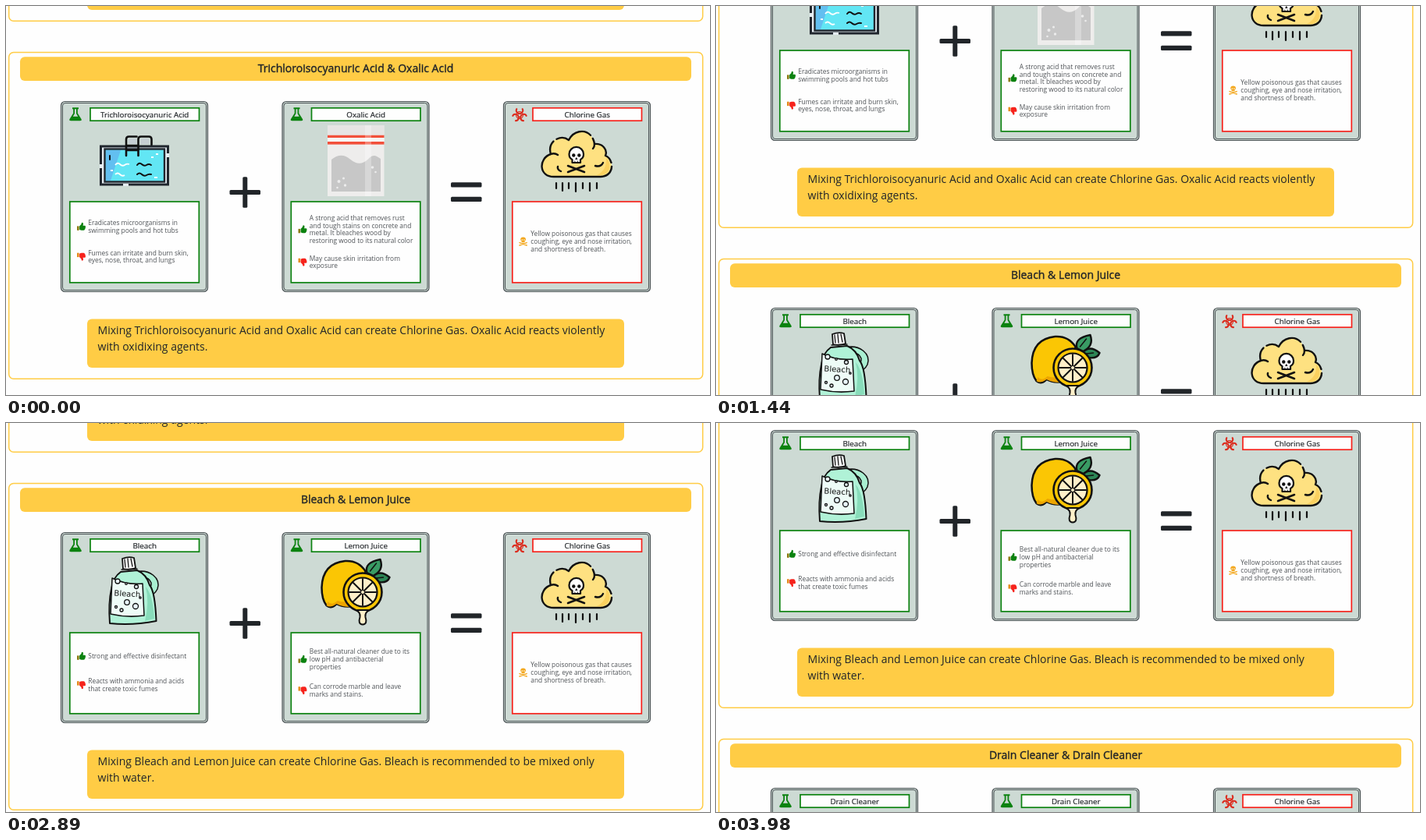
Recreate the animation shown at these times as an HTML page. Size 902 px wide and 499 px high, loop 4.05 s.

```html
<!DOCTYPE html>
<html lang="en">
<head>
<meta charset="utf-8">
<title>Dangerous mixtures</title>
<style>
  html, body { margin: 0; width: 100%; height: 100%; overflow: hidden; background: #fefefe; }
  svg { display: block; width: 100%; height: 100%; overflow: hidden; font-family: "Open Sans", sans-serif; fill: #212529; }
  .head { font-size: 14px; text-anchor: middle; stroke: #212529; stroke-width: .4px; }
  .name { font-size: 9.8px; text-anchor: middle; stroke: #212529; stroke-width: .2px; }
  .note { font-size: 8.4px; fill: #505458; }
  .caption { font-size: 14px; }
  .ink { fill: none; stroke: #111; stroke-width: 2.4px; stroke-linecap: round; stroke-linejoin: round; }
</style>
</head>
<body>
<svg><g id="page"></g></svg>
<script>
const YELLOW = '#ffcc45', GREEN = '#0b820f', RED = '#f6231c', CARD = '#cddad4', DARK = '#212529', EDGE = '#4a5154';
const PITCH = 459, COLUMN = 283.5;

const rect = (x, y, w, h, fill, more = '') =>
  `<rect x="${x}" y="${y}" width="${w}" height="${h}" fill="${fill}" ${more}/>`;
const circle = (x, y, r, fill, more = '') =>
  `<circle cx="${x}" cy="${y}" r="${r}" fill="${fill}" ${more}/>`;
const path = (d, fill = 'none', more = '') => `<path d="${d}" fill="${fill}" ${more}/>`;
const ink = (d, fill = 'none', width = 2.4) =>
  `<path class="ink" d="${d}" style="fill:${fill};stroke-width:${width}px"/>`;
const text = (cls, x, y, s) => `<text class="${cls}" x="${x}" y="${y}">${s.replace('&', '&amp;')}</text>`;
const group = (transform, body) => `<g transform="${transform}">${body}</g>`;

// Small icons
const flask = () =>
  path('M85 130.3h8v2h-1.2v5.2l4.7 7.6q1 2.2-1.6 2.2h-11.8q-2.6 0-1.6-2.2l4.7-7.6v-5.2h-1.2z', GREEN) +
  path('M88 132.3h2v5.8l2.2 3.6h-6.4l2.2-3.6z', CARD);

const biohazard = () => {
  const arm = path('M-3.2-8.6A4.1 4.1 0 1 0 3.2-8.6', 'none', 'stroke="#dc2a1c" stroke-width="2"') +
    path('M0-3V0', 'none', 'stroke="#dc2a1c" stroke-width="1.6"');
  return group('translate(91 140)',
    [0, 120, 240].map(a => group(`rotate(${a})`, arm)).join('') +
    circle(0, 0, 4.4, 'none', 'stroke="#dc2a1c" stroke-width="1.2"') + circle(0, 0, 1.2, CARD));
};

const thumb = (y, up) => group(`translate(91 ${y}) scale(1 ${up ? 1 : -1})`,
  rect(0, -.6, 2.6, 5.4, up ? '#8a7a10' : '#e58a1c') +
  path('M3.1-.6L5.4-3Q5.6-5.2 6.8-5.2Q8.4-5 8-2.8L7.5-1.2H10Q11.3-1 10.9.6Q11 1.6 10.5 2.2Q10.5 3.4 9.8 3.7Q9.6 4.8 8.4 4.8H6Q4.5 4.7 3.1 3.8z', up ? GREEN : RED));

const poison = y => group(`translate(95.6 ${y})`,
  path('M-4.6 1.6L4.6 5M4.6 1.6L-4.6 5', 'none', 'stroke="#f3a81f" stroke-width="1.5" stroke-linecap="round"') +
  path('M-3.4-2.4A3.4 3.1 0 0 1 3.4-2.4Q3.3-.8 2-.2V1.3H-2V-.2Q-3.3-.8-3.4-2.4z', '#f3a81f') +
  circle(-1.3, -2, .8, '#fff') + circle(1.3, -2, .8, '#fff'));

// Illustrations
const pool = () =>
  rect(121.5, 180, 86, 49, '#e6eef3', 'stroke="#20262e" stroke-width="3"') +
  rect(126.5, 183.5, 76.5, 42, '#62e6f4', 'stroke="#20262e" stroke-width="2.4"') +
  path('M128 185h19l-13 39h-6z', '#62bff0') +
  rect(120, 203, 3, 5, '#e6eef3') + rect(206, 189, 3, 5, '#e6eef3') + rect(150, 228, 7, 3, '#e6eef3') +
  ink('M154 192V171q0-3.5 3.5-3.5h10M169.5 192V171q0-3.5 3.5-3.5h10q3.5 0 3.5 3.5v7M154 179h15.5M154 185h15.5', 'none', 2.6) +
  path('M157 177v-4q0-3 3-3h7v7zM172.5 177v-4q0-3 3-3h5q3 0 3 3v4z', '#c5ced3') +
  ink('M168 204q3-4 6-1t6 1 6 0M168 216q3-3 6 0t6 1 6-1M133 192v5', 'none', 2) +
  path('M140 204q3-4 6-1t6 1 6-1M140 216q3-3 6 0t6 1M186 194h3M192 190h3M134 211h3M190 220h4', 'none', 'stroke="#fff" stroke-width="1.8"');

const bag = () =>
  rect(128.5, 153, 72.5, 91, '#eeedec') +
  rect(128.5, 165.5, 72.5, 3.6, '#f2503b') + rect(128.5, 169.1, 72.5, 5, '#f8f6f5') +
  rect(128.5, 174, 72.5, 3.6, '#f2503b') + rect(128.5, 153, 72.5, 12.5, '#e6e5e4') +
  path('M133.5 197C142 190 150 190 158 197S174 203 181 196S191 193 196.5 196V238H133.5z', '#c7c7c7') +
  rect(176.5, 153, 8, 91, '#fff', 'opacity=".28"') +
  [[143, 225, 2], [149, 221, 1.5], [141, 233, 1.3], [151, 230, 1.7], [186, 207, 1.8], [190, 213, 1.3]]
    .map(([x, y, r]) => circle(x, y, r, '#ececec')).join('');

const cloud = () => {
  const shape = 'M136 219C115 220 115 195 131 190C126 173 144 164 154 172C162 156 184 157 187 177C198 176 204 185 201 192C213 197 212 219 195 219z';
  const drops = [[138, 234], [146, 237], [154, 234], [163, 238], [172, 234], [181, 237], [190, 234]];
  return path(shape, '#fee181') +
    path('M202 195C209 201 208 216 195 217H190Q203 211 202 195z', '#fbd15f') +
    `<path class="ink" d="${shape}" stroke-dasharray="62 5 50 5 44 5 90 5"/>` +
    ink('M131 190q5-2 9 1M187 177q0 4-2 6M188 205q7 2 10-4M140 206q-1 4 4 6') +
    drops.map(([x, y]) => ink(`M${x} 227V${y}`, 'none', 2.2)).join('') +
    ink('M153 205L174 213M174 205L153 213', 'none', 2.6) +
    ink('M154.5 190A9.2 9 0 0 1 173 190Q173 195 169 197V201H158.5V197Q154.5 195 154.5 190z', '#fff', 2.2) +
    circle(160.3, 191.5, 2.2, '#111') + circle(167.3, 191.5, 2.2, '#111') +
    path('M163.8 194.5l1.2 2h-2.4zM161.8 198.5v2M165.5 198.5v2', '#111', 'stroke="#111" stroke-width=".8"');
};

const bleach = () =>
  ink('M166 173C184 169 199 181 194 195Q190 203 182 204L180 196Q187 193 186 187Q183 178 170 180z', '#a9efd1', 1.5) +
  ink('M147 173L168 171Q180 176 184 190Q191 198 192.5 236Q162 242 133 239Q131 213 135 195Q137 180 147 173z', '#b0f2d7', 2) +
  path('M179 192Q188 202 190 233L178 236Q184 212 179 192z', '#88dcba') +
  group('translate(1 2)',
    ink('M148 154Q156 151 163 153L165 166Q157 169 149 167z', '#fff', 1.8) +
    ink('M151 155l1 10M155 154l1 11M159 154l2 10M147 168l20-1', 'none', 1.3)) +
  ink('M136 181Q154 190 175 188L177 229Q155 232 134 227z', '#eefcf7', 1.5) +
  [[143, 185, 3], [167, 192, 2.5], [155, 212, 3.3], [166, 217, 3.5], [141, 218, 1.5], [148, 222, 2], [172, 206, 1.2], [154, 188, 1.3]]
    .map(([x, y, r]) => circle(x, y, r, '#e8f6fb', 'stroke="#111" stroke-width="1.3"')).join('') +
  group('rotate(3 156 201)', '<text x="138.5" y="204.5" font-family="\'DejaVu Sans\', sans-serif" font-size="10" fill="#111">Bleach</text>');

const lemon = () => {
  const cx = 173.5, cy = 199;
  const spokes = [0, 45, 90, 135].map(a =>
    group(`rotate(${a} ${cx} ${cy})`, ink(`M${cx - 17} ${cy}H${cx + 17}`, 'none', 2))).join('');
  return ink('M127 216Q121 208 121 193Q122 162 151 159Q168 158 177 172L173 214Q152 221 140 214Q133 221 127 216z', '#fbc604', 2.5) +
    path('M129 211Q134 217 141 210Q155 214 168 208L170 217Q151 220 140 214Q132 220 127 216z', '#eda500') +
    ink('M179 174Q175 161 196 157Q201 171 187 178z', '#399b64') +
    ink('M186 180Q195 169 208 180Q205 188 193 186z', '#2d8656') +
    ink('M183 172l8-10M191 181l9-1', 'none', 1.5) +
    circle(cx, cy, 24.5, '#fbc604', 'stroke="#111" stroke-width="2.6"') +
    circle(cx, cy, 18.5, '#fff0c9', 'stroke="#111" stroke-width="2.2"') + spokes +
    circle(cx, cy, 2.5, '#fff0c9', 'stroke="#111" stroke-width="1"') +
    ink('M165 222Q171 225 170 231Q167 240 173.5 240.5Q180 240 177 231Q176 225 182 222z', '#fff0c9', 2);
};

// Page parts
const note = ({ y, lines, icon }) => icon(y) + lines.map((s, i) =>
  text('note', 105.3, y + (i - (lines.length - 1) / 2) * 9.8 + 3, s)).join('');
const good = (y, ...lines) => ({ y, lines, icon: c => thumb(c, true) });
const bad = (y, ...lines) => ({ y, lines, icon: c => thumb(c, false) });
const toxic = (y, ...lines) => ({ y, lines, icon: poison });

const card = ({ name, art, notes = [], color = GREEN, badge = flask }, column) =>
  group(`translate(${column * COLUMN} 0)`,
    rect(70.5, 122.5, 188, 244, CARD, `rx="5" stroke="${EDGE}" stroke-width="1.2"`) +
    rect(72.5, 124.5, 184, 240, 'none', `rx="3.5" stroke="${EDGE}"`) +
    badge() +
    rect(108, 130.8, 139.5, 16.4, '#fefefe', `stroke="${color}" stroke-width="1.7"`) +
    text('name', 177.7, 143, name) +
    (art ? art() : '') +
    rect(81.8, 251, 165.5, 103.8, '#fefefe', `stroke="${color}" stroke-width="1.7"`) +
    notes.map(note).join(''));

const gas = {
  name: 'Chlorine Gas', art: cloud, color: RED, badge: biohazard,
  notes: [toxic(302, 'Yellow poisonous gas that causes', 'coughing, eye and nose irritation,', 'and shortness of breath.')]
};

const bar = (x, y, w, h) => rect(x, y, w, h, DARK, 'rx="1.5"');
const operators =
  bar(286.5, 236, 39.5, 6) + bar(303.3, 219.2, 6, 39.5) +
  bar(570, 226.3, 39.5, 6.3) + bar(570, 244.7, 39.5, 6.3);

const section = ({ title = '', cards = [], caption = [] }, index) =>
  group(`translate(0 ${(index - 1) * PITCH})`,
    rect(3.7, 59.5, 889, 418.8, 'none', `rx="6" stroke="${YELLOW}" stroke-width="1.5"`) +
    rect(18, 65.3, 860, 30.6, YELLOW, 'rx="6"') + text('head', 448, 85.3, title) +
    cards.map(card).join('') + operators +
    rect(104, 401.5, 688, 62.6, YELLOW, 'rx="6"') +
    caption.map((s, i) => text('caption', 117.6, 421 + i * 21, s)).join(''));

const sections = [
  {},
  {
    title: 'Trichloroisocyanuric Acid & Oxalic Acid',
    cards: [
      { name: 'Trichloroisocyanuric Acid', art: pool, notes: [
        good(283, 'Eradicates microorganisms in', 'swimming pools and hot tubs'),
        bad(321.5, 'Fumes can irritate and burn skin,', 'eyes, nose, throat, and lungs')] },
      { name: 'Oxalic Acid', art: bag, notes: [
        good(286.5, 'A strong acid that removes rust', 'and tough stains on concrete and', 'metal. It bleaches wood by', 'restoring wood to its natural color'),
        bad(328.5, 'May cause skin irritation from', 'exposure')] },
      gas],
    caption: ['Mixing Trichloroisocyanuric Acid and Oxalic Acid can create Chlorine Gas. Oxalic Acid reacts violently', 'with oxidixing agents.']
  },
  {
    title: 'Bleach & Lemon Juice',
    cards: [
      { name: 'Bleach', art: bleach, notes: [
        good(281, 'Strong and effective disinfectant'),
        bad(318, 'Reacts with ammonia and acids', 'that create toxic fumes')] },
      { name: 'Lemon Juice', art: lemon, notes: [
        good(285, 'Best all-natural cleaner due to its', 'low pH and antibacterial', 'properties'),
        bad(325, 'Can corrode marble and leave', 'marks and stains.')] },
      gas],
    caption: ['Mixing Bleach and Lemon Juice can create Chlorine Gas. Bleach is recommended to be mixed only', 'with water.']
  },
  {
    title: 'Drain Cleaner & Drain Cleaner',
    cards: [{ name: 'Drain Cleaner' }, { name: 'Drain Cleaner' }, gas]
  }
];

const page = document.getElementById('page');
page.innerHTML = sections.map(section).join('');

// Scroll curve: step, distance, speed per step
const curve = [[0, 0, 0], [12, 81, 13.5], [20, 194, 14.3], [32, 362, 11], [41, 441, 8.6], [47, 494, 8.5], [57, 572, 7.5]];
const scrollAt = step => {
  const i = Math.max(1, curve.findIndex(p => p[0] >= step));
  const [x0, y0, v0] = curve[i - 1], [x1, y1, v1] = curve[i];
  const w = x1 - x0, u = (step - x0) / w, r = 1 - u;
  return y0 * r * r * (1 + 2 * u) + y1 * u * u * (3 - 2 * u) + w * u * r * (v0 * r - v1 * u);
};

const LOOP = 4050, LAST = 57;
const shortSteps = new Set([4, 11, 16, 27, 30, 44, 47, 52]);
const keyframes = [];
for (let step = 0, time = 0; step <= LAST; step++) {
  keyframes.push({
    offset: time / LOOP,
    transform: `translateY(${-Math.round(scrollAt(step))}px)`,
    easing: 'steps(1, end)'
  });
  time += step === 0 ? 140 : shortSteps.has(step) ? 60 : 70;
}
keyframes.push({ ...keyframes[LAST], offset: 1 });
page.animate(keyframes, { duration: LOOP, iterations: Infinity });
</script>
</body>
</html>
```
